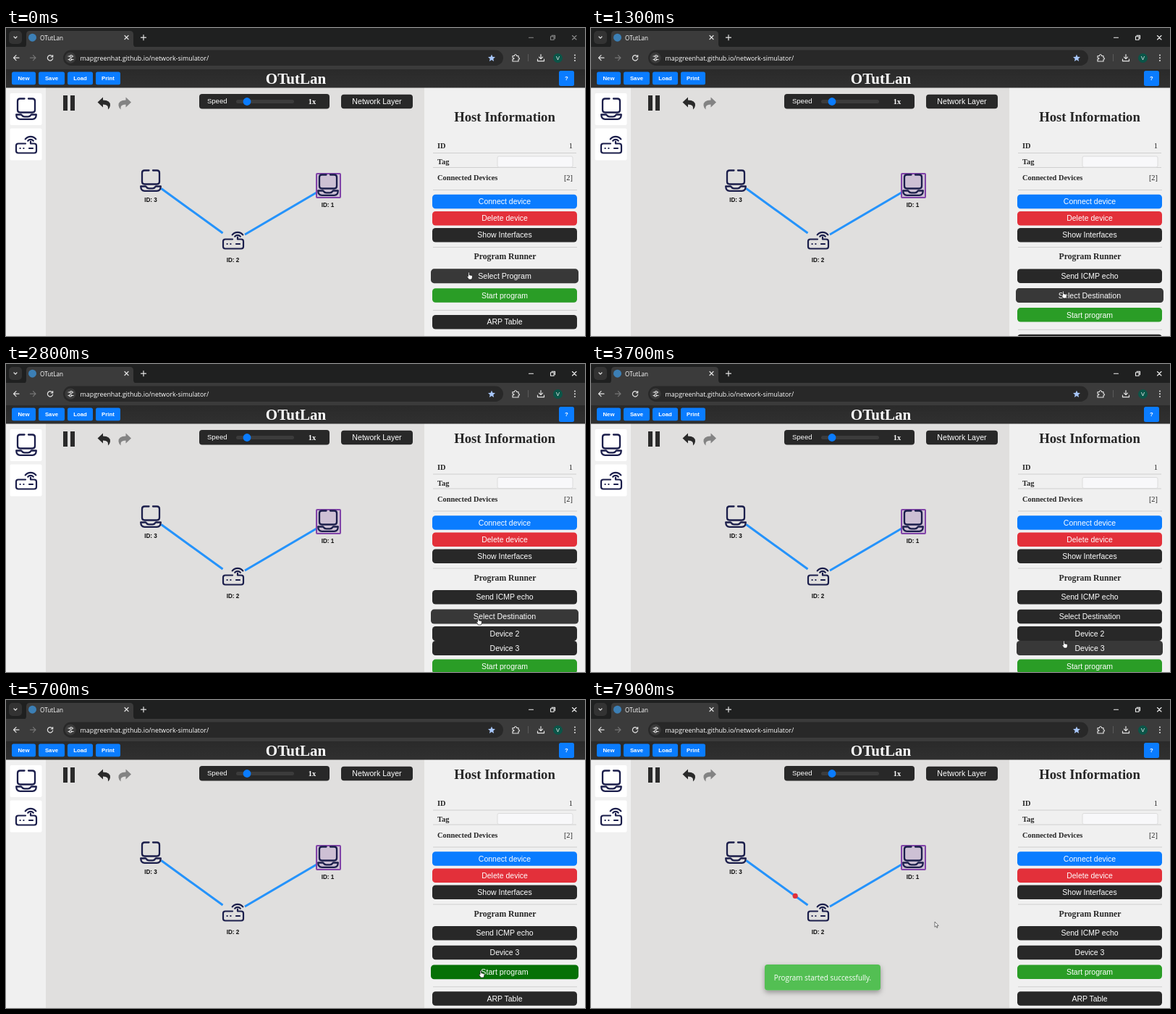
These frames come from a looping animation (800 px wide and 425 px high, 8 s). An HTML page:

```html
<!DOCTYPE html>
<html lang="en">
<head>
<meta charset="utf-8">
<title>OTutLan</title>
<style>
html, body { margin: 0; width: 100%; height: 100%; overflow: hidden; background: #e0dfde; }
svg { display: block; width: 800px; height: 425px; }
text { font-family: "Liberation Sans", Arial, sans-serif; fill: #fff; }
.serif { font-family: "Liberation Serif", "Times New Roman", serif; font-size: 10.4px; fill: #262626; }
.ui { font-family: "Open Sans", "Noto Sans", sans-serif; }
.bold { font-weight: bold; }
.mid { text-anchor: middle; }
.end { text-anchor: end; }
.line { fill: none; stroke-linecap: round; stroke-linejoin: round; }
.btn { font-size: 10.5px; }
.tag { font-size: 8.2px; font-weight: bold; fill: #111; text-anchor: middle; }
</style>
</head>
<body>
<svg viewBox="0 0 800 425">
  <defs>
    <g id="host" class="line" stroke="#1b1e4b" stroke-width="2.3">
      <path d="M-2.5-14.5H-8.5Q-12-14.5-12-11V1Q-12 4.5-8.5 4.5H8.5Q12 4.5 12 1V-11Q12-14.5 8.5-14.5H3"/>
      <path d="M-13.8 7.5H-7Q-5 10.3-2.5 10.3H2.5Q5 10.3 7 7.5H13.8Q13.5 14-9.5 14H9.5Q-13.5 14-13.8 7.5" visibility="hidden"/>
      <path d="M-13.8 7.5H-7Q-5 10.3-2.5 10.3H2.5Q5 10.3 7 7.5H13.8Q13.6 13.8 8.5 13.8H-8.5Q-13.6 13.8-13.8 7.5Z"/>
    </g>
    <g id="router" class="line" stroke="#1b1e4b" stroke-width="2.2">
      <path d="M-1-2.5H-11Q-14-2.5-14 .5V7.5Q-14 10.5-11 10.5H11Q14 10.5 14 7.5V.5Q14-2.5 11-2.5H6V-5.5"/>
      <path d="M-8.5 4H-8.3M-4-0 M-3.7 4H-3.5M4 4H9" />
      <path d="M2.2-6.3A5 5 0 0 1 9.8-6.3M-1.3-8.6A9.2 9.2 0 0 1 13.3-8.6"/>
    </g>
    <filter id="shade" x="-20%" y="-50%" width="140%" height="220%">
      <feDropShadow dx="0" dy="3" stdDeviation="3.5" flood-color="#000" flood-opacity=".35"/>
    </filter>
    <linearGradient id="bar" x2="0" y2="1">
      <stop offset="0" stop-color="#2a2a2a"/><stop offset="1" stop-color="#303030"/>
    </linearGradient>
  </defs>

  <!-- simulator canvas -->
  <rect y="57" width="800" height="368" fill="#e0dfde"/>
  <rect y="82" width="55" height="343" fill="#f0f0f0"/>
  <rect x="5.5" y="90" width="44" height="44" rx="2" fill="#fff"/>
  <rect x="5.5" y="138.5" width="44" height="44" rx="2" fill="#fff"/>
  <use href="#host" x="28" y="112"/>
  <use href="#router" x="28" y="162"/>

  <path d="M79 93h6v21h-6zM89 93h6v21h-6z" fill="#2a2a2a"/>
  <path id="undo" d="M126.500 102.500L134 95.500V99.500Q144.500 99.500 144 107Q143.500 110.500 141 112.500Q142.500 105.500 134 105.500V109.500Z" fill="#2a2a2a"/>
  <path d="M173 102.500L165.500 95.500V99.500Q155 99.500 155.500 107Q156 110.500 158.500 112.500Q157 105.500 165.500 105.500V109.500Z" fill="#838383"/>

  <rect x="267" y="91" width="180" height="20.500" rx="4" fill="#282828"/>
  <text x="278" y="104.300" font-size="9.500">Speed</text>
  <rect x="318" y="99" width="80" height="5" rx="2.500" fill="#3c3c3c"/>
  <circle cx="333" cy="101.500" r="5.400" fill="#0a7cff"/>
  <text class="serif bold mid" x="423" y="105" style="fill:#fff">1x</text>
  <rect x="463" y="91.800" width="99" height="19.500" rx="4" fill="#282828"/>
  <text class="mid" x="512.500" y="105.300" font-size="10.600">Network Layer</text>

  <path d="M430 226.500L330 285M214.500 221.500L299.500 283" stroke="#2593fb" stroke-width="3"/>
  <circle id="packet" r="3.600" fill="#e3303a"/>
  <rect x="429" y="201" width="33" height="33" rx="1" fill="#8144a8" fill-opacity=".2" stroke="#8144a8" stroke-width="2"/>
  <use href="#host" x="200" y="211"/>
  <use href="#host" x="445" y="217"/>
  <use href="#router" x="314" y="294"/>
  <text class="tag" x="200" y="240">ID: 3</text>
  <text class="tag" x="444.500" y="246.500">ID: 1</text>
  <text class="tag" x="313.500" y="323">ID: 2</text>

  <g id="toast">
    <rect x="240" y="365" width="160" height="35.500" rx="4" fill="#53bf53" filter="url(#shade)"/>
    <text class="ui mid" x="320" y="386.500" font-size="9.900">Program started successfully.</text>
  </g>

  <!-- side panel -->
  <rect x="578" y="82" width="222" height="343" fill="#f0f0f0"/>
  <g id="panel">
    <text class="serif bold mid" x="689" y="129" style="font-size:18.700px">Host Information</text>
    <path d="M590 172.500H788M590 192.500H788M590 223.500H789M590 302.500H789" stroke="#cfcfcf"/>
    <text class="serif bold" x="596" y="166">ID</text>
    <text class="serif end" x="783" y="166">1</text>
    <text class="serif bold" x="596" y="188">Tag</text>
    <rect x="679" y="177" width="104" height="15" rx="2" fill="#f8f8fa" stroke="#dcdcdc"/>
    <text class="serif bold" x="596" y="210">Connected Devices</text>
    <text class="serif end" x="783" y="210">[2]</text>
    <text class="serif bold mid" x="689.500" y="319.300" style="font-size:11.700px">Program Runner</text>
    <path id="rule" d="M590 389.500H789" stroke="#cfcfcf"/>
  </g>

  <!-- browser chrome -->
  <rect width="800" height="27" fill="#1f2020"/>
  <rect x="4" y="4" width="18" height="18" rx="5" fill="#333"/>
  <path d="M25 27Q28 26 28 22V9Q28 4 33 4H171Q176 4 176 9V22Q176 26 180 27Z" fill="#3b3b3b"/>
  <rect y="26" width="800" height="31" fill="#3b3b3b"/>
  <rect x="79" y="30.500" width="608" height="21.500" rx="10.700" fill="#282828"/>
  <circle cx="36.500" cy="13.200" r="5.500" fill="#3c7fb5"/>
  <text class="ui" x="47" y="16.500" font-size="8.200">OTutLan</text>
  <text class="ui" x="102.500" y="44.500" font-size="8.900">mapgreenhat.github.io/network-simulator/</text>
  <g class="line" stroke="#e3e3e3" stroke-width="1.200">
    <path d="M11 12L13 14.200L15 12M164 10.500L169 15.500M169 10.500L164 15.500M186.500 13.200H193.500M190 9.700V16.700"/>
    <path d="M18 41.200H10.500M14 37.700L10.500 41.200L14 44.700"/>
    <path d="M33.500 41.200H41M37.500 37.700L41 41.200L37.500 44.700" stroke="#777"/>
    <path d="M64.300 39.500A3.700 3.700 0 1 0 64.700 42M64.700 37.500V40H62.200"/>
    <path d="M700 38.500H702.500Q702.500 36.500 704 36.500T705.500 38.500H708V41Q709.500 41 709.500 42.200T708 43.500V46H700V43Q702 43 702 42T700 41Z"/>
    <path d="M739 36.500V42.500M736.500 40.200L739 42.700L741.500 40.200M734.500 43V45.700H743.500V43"/>
    <path d="M86 39H88M92 39H93M86 43.500H87M91 43.500H93"/>
    <circle cx="90" cy="39" r="1.500"/><circle cx="89" cy="43.500" r="1.500"/>
  </g>
  <circle cx="89" cy="41.200" r="7.600" fill="#fff" fill-opacity=".09"/>
  <path d="M671 36.500L672.400 39.800L676 40.100L673.300 42.500L674.100 46L671 44.100L667.900 46L668.700 42.500L666 40.100L669.600 39.800Z" fill="#a8c7fa"/>
  <path d="M721.500 36V46" stroke="#5a5a5a"/>
  <circle cx="762.500" cy="41.500" r="6.500" fill="#0b5548"/>
  <text class="mid" x="762.500" y="44.300" font-size="7.500">V</text>
  <g fill="#e3e3e3"><circle cx="786" cy="37.500" r="1"/><circle cx="786" cy="41.200" r="1"/><circle cx="786" cy="45" r="1"/></g>
  <g id="controls" class="line" stroke-width="1.100">
    <path d="M722.500 13.200H728.500M782.500 10.500L788 16M788 10.500L782.500 16"/>
    <path d="M752.500 11.700H757V16.200H752.500ZM754 10.200H758.500V14.700"/>
  </g>

  <!-- page header -->
  <rect y="57" width="800" height="25.500" fill="url(#bar)"/>
  <g id="menu"></g>
  <text class="serif bold mid" x="400.500" y="77" style="font-size:21px;fill:#fff">OTutLan</text>

  <path id="hand" d="M-2.500-4.500Q-1.500-5.500-.8-4.500V-1.200L2.500-.6Q3.600-.2 3.500 1Q3.400 3.500 2.300 5H-1.600Q-2.500 3-4 1.200Q-3.500 0-2.500 1Z" fill="#fff" stroke="#111" stroke-width=".7"/>
  <path id="arrow" d="M0 0V7.300L1.700 5.800L2.900 8.400L4 7.900L2.900 5.400H5.200Z" fill="#fff" stroke="#222" stroke-width=".6"/>
</svg>
<script>
const LOOP = 8000;
const DARK = '#282828', DARK_HOVER = '#383838', GREEN = '#2a9d26', GREEN_HOVER = '#067106';
const $ = id => document.getElementById(id);

function add(parent, tag, attrs, label) {
  const el = document.createElementNS('http://www.w3.org/2000/svg', tag);
  for (const k in attrs) el.setAttribute(k, attrs[k]);
  if (label) el.textContent = label;
  return parent.appendChild(el);
}

for (const [label, x, w, y = 60.5, h = 17.8] of
  [['New', 8, 33], ['Save', 45, 36], ['Load', 85, 35], ['Print', 124, 34], ['?', 764, 21, 59, 21]]) {
  add($('menu'), 'rect', { x, y, width: w, height: h, rx: 2.5, fill: '#0a7cff' });
  add($('menu'), 'text', { x: x + w / 2, y: y + h / 2 + 2.8, class: 'bold mid', 'font-size': 7.8 }, label);
}

// A button is drawn around its own centre so that hovering can scale it.
function button(label, y, fill, hoverFill, h = 19.5, grow = 1.02) {
  const g = add($('panel'), 'g', {});
  const box = add(g, 'rect', { x: -100, y: -h / 2, width: 200, height: h, rx: 4.5, fill });
  const text = add(g, 'text', { class: 'btn mid', y: 3.7 }, label);
  const place = (top, shown = true, tipY = -1) => {
    const over = hoverFill && tipY >= top && tipY < top + h;
    g.setAttribute('transform', `translate(689 ${top + h / 2}) scale(${over ? grow : 1})`);
    g.setAttribute('visibility', shown ? 'visible' : 'hidden');
    box.setAttribute('fill', over ? hoverFill : fill);
  };
  place(y);
  return { place, text };
}

button('Connect device', 229.8, '#0a7cff');
button('Delete device', 253, '#e3303a');
button('Show Interfaces', 276, DARK);
const program = button('Select Program', 332.5, DARK, DARK_HOVER);
const target = button('Select Destination', 359.3, DARK, DARK_HOVER);
const start = button('Start program', 359.3, GREEN, GREEN_HOVER);
const arp = button('ARP Table', 396, DARK);
const options = [0, 1].map(() => button('', 0, DARK, DARK_HOVER, 20, 1.01));

// times of the user's actions
const OPEN_A = 250, PICK_A = 950, SCROLL = 1600, OPEN_B = 2500, PICK_B = 4550, RUN = 5740;

// [time, x, y] of the pointer
const pointer = [
  [0, 641, 342], [350, 641, 342], [800, 654, 368], [1500, 654, 368], [1900, 654, 355],
  [2900, 654, 355], [3650, 655, 387], [3750, 655, 387], [4000, 655, 390], [4650, 655, 390],
  [5300, 657.5, 378], [5950, 657.5, 378], [6500, 475, 306], [LOOP, 475, 306]
];

const ease = p => p * p * (3 - 2 * p);
const clamp = p => Math.max(0, Math.min(1, p));
const mix = (a, b, p) => a + (b - a) * p;

function pointerAt(t) {
  const i = Math.max(1, pointer.findIndex(k => k[0] > t));
  const [t0, x0, y0] = pointer[i - 1], [t1, x1, y1] = pointer[i];
  const p = ease((t - t0) / (t1 - t0));
  return [mix(x0, x1, p), mix(y0, y1, p)];
}

// Packet runs along both links at one constant speed.
const links = [[430, 226.5, 330, 285], [299.5, 283, 214.5, 221.5]];
function packetAt(t) {
  let way = (t - RUN) * 0.0635;
  for (const [x0, y0, x1, y1] of links) {
    const len = Math.hypot(x1 - x0, y1 - y0);
    if (way <= len) return [mix(x0, x1, way / len), mix(y0, y1, way / len)];
    way -= len;
  }
  return links[1].slice(2);
}

const move = (el, x, y) => el.setAttribute('transform', `translate(${x} ${y})`);
const show = (el, on) => el.setAttribute('visibility', on ? 'visible' : 'hidden');

function draw(t) {
  const scroll = 20.5 * ease(clamp((t - SCROLL) / 300));
  const openA = t >= OPEN_A && t < PICK_A, openB = t >= OPEN_B && t < PICK_B;
  const picked = t >= PICK_A;
  const [x, y] = pointerAt(t);
  const inPanel = x > 589;
  const tip = inPanel ? y - 5 + scroll : -1;

  move($('panel'), 0, -scroll);
  const extra = (picked ? 26.8 : 0) + (openA || openB ? 42 : 0);
  program.text.textContent = picked ? 'Send ICMP echo' : 'Select Program';
  target.text.textContent = t >= PICK_B ? 'Device 3' : 'Select Destination';
  program.place(332.5, true, tip);
  target.place(359.3, picked, tip);
  start.place(359.3 + extra, true, tip);
  arp.place(396 + extra);
  move($('rule'), 0, extra);

  const names = openA ? ['Send ICMP echo', 'Echo server'] : ['Device 2', 'Device 3'];
  options.forEach((o, i) => {
    o.text.textContent = names[i];
    o.place((openA ? 355.7 : 382.5) + 20 * i, openA || openB, tip);
  });

  $('controls').setAttribute('stroke', t < 200 ? '#8a8a8a' : '#f0f0f0');
  show($('hand'), inPanel);
  show($('arrow'), !inPanel);
  move($('hand'), x, y);
  move($('arrow'), x, y);

  show($('packet'), t >= RUN);
  if (t >= RUN) move($('packet'), ...packetAt(t));
  $('toast').setAttribute('opacity', clamp((t - RUN) / 300));
}

const began = performance.now();
function tick() {
  draw((performance.now() - began) % LOOP);
  requestAnimationFrame(tick);
}
draw(0);
requestAnimationFrame(tick);
</script>
</body>
</html>
```
